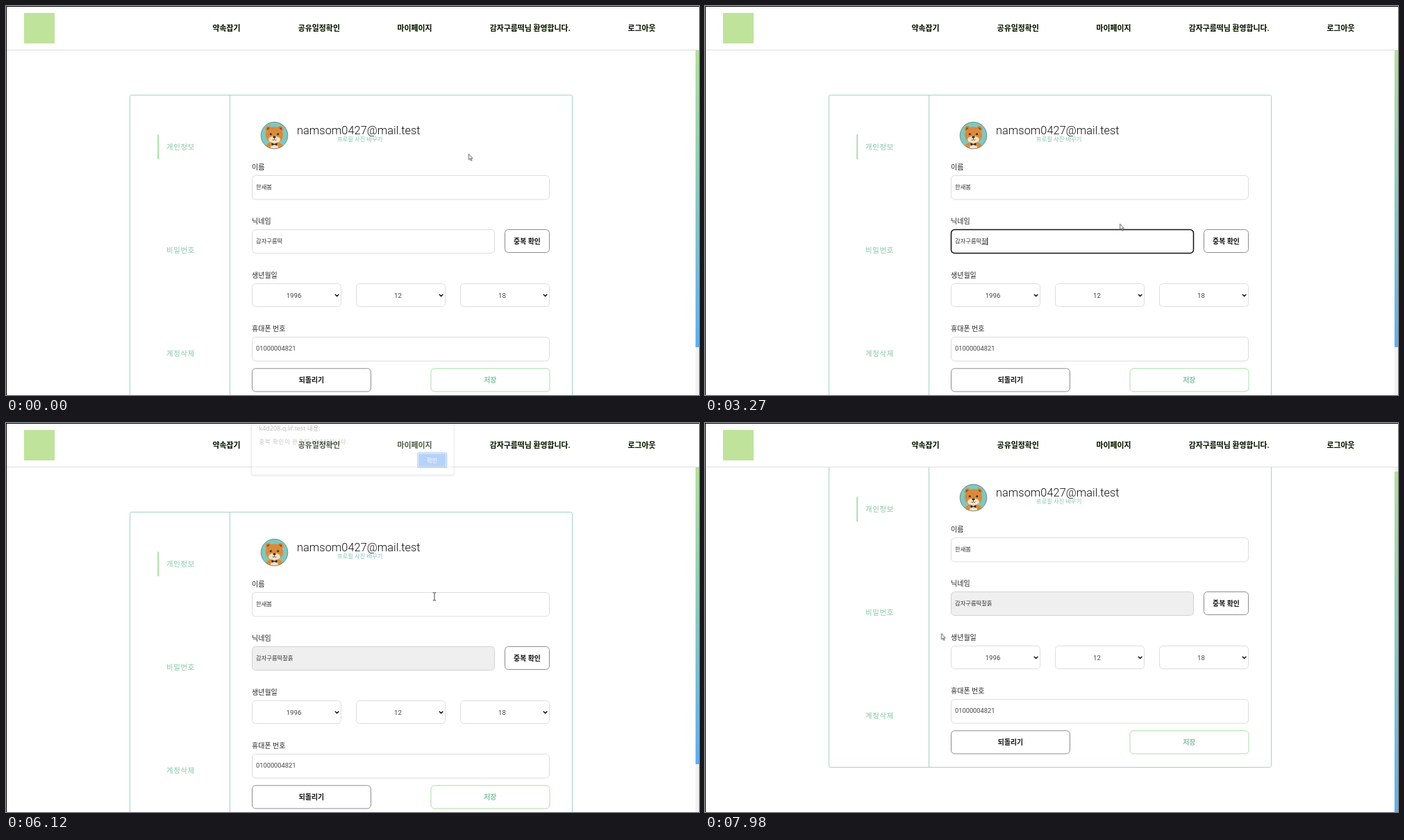
Animation, 998 px wide and 561 px high, one loop 8 s. Source, as an HTML page:

```html
<!DOCTYPE html>
<html lang="ko">
<head>
<meta charset="utf-8">
<title>개인정보 수정</title>
<style>
html, body { margin: 0; width: 100%; height: 100%; overflow: hidden; background: #fff; }
svg { display: block; width: 100vw; height: 100vh; }
text { font-family: Roboto, "Noto Sans CJK KR", "Noto Sans CJK", sans-serif; fill: #222; white-space: pre; }

.nav text { font-size: 10.9px; font-weight: 700; fill: #111; }
.nav { filter: drop-shadow(.5px .7px .5px #96dd55); }
.side text { font-size: 10.4px; letter-spacing: .65px; fill: #84c6a5; }
.label { font-size: 10px; }
.value { font-size: 8.3px; fill: #333; }
.digits { font-size: 9.3px; fill: #444; }
.pick { font-size: 9.6px; fill: #444; text-anchor: middle; }
.btn { font-size: 9.9px; font-weight: 700; fill: #111; text-anchor: middle; }
.frame { fill: none; stroke: #a5d3c3; }
.field { fill: #fff; stroke: #dcdcdc; }
.dark { fill: #fff; stroke: #8c8c8c; }
.chevron { fill: none; stroke: #111; stroke-width: 1.4; }

#page, #dialog, #mouse, #nick, #check, #arrow, #beam, #tick, #bar {
  animation: 8s linear infinite;
}
#nick, #check, #arrow, #beam, #tick { animation-timing-function: step-end; }

#page { animation-name: scroll; }
@keyframes scroll {
  0%, 80.6% { transform: translateY(0); }
  81.5% { transform: translateY(-34px); }
  82.25% { transform: translateY(-63px); }
  83.1% { transform: translateY(-76.6px); }
  84.2%, 100% { transform: translateY(-79px); }
}
#bar { animation-name: bar; }
@keyframes bar {
  0%, 80.6% { y: 64px; height: 428px; }
  81.5% { y: 66px; height: 456px; }
  82.25% { y: 67px; height: 480px; }
  83.1% { y: 68px; height: 491px; }
  84.2%, 100% { y: 70px; height: 491px; }
}
#dialog { opacity: 0; animation-name: dialog; }
@keyframes dialog {
  0%, 61.7% { opacity: 0; transform: translateY(-13px); }
  64%, 75.5% { opacity: 1; transform: none; }
  77%, 100% { opacity: 0; transform: translateY(-13px); }
}
#nick { animation-name: nick; }
@keyframes nick {
  0% { stroke: #dcdcdc; stroke-width: 1; fill: #fff; }
  16.25% { stroke: #111; stroke-width: 1.5; fill: #fff; }
  60.88% { stroke: #dcdcdc; stroke-width: 1; fill: #fff; }
  75.5%, 100% { stroke: #d2d2d2; stroke-width: 1; fill: #efefef; }
}
#check { animation-name: check; }
@keyframes check {
  0% { fill: #fff; stroke: #8c8c8c; }
  52.6% { fill: #bdf0b1; stroke: #a6dc9c; }
  61.7%, 100% { fill: #fff; stroke: #8c8c8c; }
}
#tick { animation-name: tick; }
@keyframes tick {
  0% { opacity: 0; }
  4.125% { opacity: 1; }
  10.375%, 100% { opacity: 0; }
}
#mouse { animation-name: mouse; }
@keyframes mouse {
  0%, 8.6% { transform: translate(666.3px, 213.3px); }
  10.75%, 12% { transform: translate(615px, 394px); }
  14.2% { transform: translate(602px, 345px); }
  16.25% { transform: translate(600px, 340px); }
  17.5%, 50.2% { transform: translate(597.6px, 314.3px); }
  53.2%, 60.9% { transform: translate(769px, 332.3px); }
  64.5% { transform: translate(740px, 290px); }
  68.2% { transform: translate(620.8px, 81px); }
  70.7%, 74.8% { transform: translate(617px, 64px); }
  76.4%, 76.9% { transform: translate(617px, 250.3px); }
  78.3% { transform: translate(612px, 335px); }
  83.1% { transform: translate(609.8px, 356px); }
  86.5%, 93.8% { transform: translate(619.3px, 372px); }
  94.7%, 97.4% { transform: translate(619.3px, 368px); }
  99.7%, 100% { transform: translate(340.5px, 303.6px); }
}
#arrow { animation-name: arrow; }
@keyframes arrow {
  0% { opacity: 1; }
  13.8% { opacity: 0; }
  17% { opacity: 1; }
  76.3% { opacity: 0; }
  77.2%, 100% { opacity: 1; }
}
#beam { opacity: 0; animation-name: beam; }
@keyframes beam {
  0% { opacity: 0; }
  13.8% { opacity: 1; }
  17% { opacity: 0; }
  76.3% { opacity: 1; }
  77.2%, 100% { opacity: 0; }
}
</style>
</head>
<body>
<svg viewBox="0 0 998 561" preserveAspectRatio="none">
  <defs>
    <linearGradient id="thumb" x2="0" y2="1">
      <stop stop-color="#b2df9c"/>
      <stop offset=".5" stop-color="#8ac8c0"/>
      <stop offset="1" stop-color="#62aef0"/>
    </linearGradient>
    <filter id="shade" x="-5%" y="-10%" width="110%" height="125%">
      <feDropShadow dx="0" dy="1" stdDeviation="1.6" flood-opacity=".35"/>
    </filter>
    <clipPath id="round"><circle r="19.3"/></clipPath>
  </defs>

  <g id="page">
    <rect class="frame" x="178.5" y="128.5" width="637" height="447" rx="2"/>
    <path class="frame" d="M322.5 128.5V575.5"/>

    <g class="side">
      <rect x="218.3" y="185.5" width="1.8" height="35.5" fill="#a5dca0"/>
      <text x="231" y="207">개인정보</text>
      <text x="231" y="355.5">비밀번호</text>
      <text x="231" y="504.5">계정삭제</text>
    </g>

    <g transform="translate(386.5 186.7)">
      <g clip-path="url(#round)">
        <circle r="20" fill="#80c7bd"/>
        <ellipse cy="18" rx="13" ry="9" fill="#dd8a38"/>
        <ellipse cy="18" rx="5.5" ry="7" fill="#f3e3c4"/>
        <g fill="#d98a3c"><circle cx="-8.5" cy="-9.5" r="4.3"/><circle cx="8.5" cy="-9.5" r="4.3"/></g>
        <g fill="#8a4e28"><circle cx="-8.5" cy="-9.5" r="2.2"/><circle cx="8.5" cy="-9.5" r="2.2"/></g>
        <ellipse cy="-.5" rx="12.5" ry="12" fill="#d98a3c"/>
        <ellipse cy="6" rx="8.5" ry="5" fill="#f3e3c4"/>
        <g fill="#3b2a22">
          <circle cx="-5.2" cy="-2" r="1.5"/><circle cx="5.2" cy="-2" r="1.5"/>
          <ellipse cy="2.2" rx="2.2" ry="1.5"/>
          <path d="M-4 10.5L0 12.2L4 10.5V15L0 13.2L-4 15Z"/>
        </g>
        <path d="M0 3V6M-3 6Q-1.5 8 0 6Q1.5 8 3 6" fill="none" stroke="#3b2a22" stroke-width=".7"/>
      </g>
      <circle r="19.3" fill="none" stroke="#4d6b66" stroke-width=".7"/>
    </g>
    <text x="419" y="184.5" font-size="16.4" font-weight="300" style="fill:#111">namsom0427@mail.test</text>
    <text x="477" y="195" font-size="8.33" style="fill:#84c4ae">프로필 사진 바꾸기</text>

    <text class="label" x="354" y="235.8">이름</text>
    <rect id="tick" x="372" y="227" width="1" height="12" fill="#111"/>
    <rect class="field" x="354.5" y="244.5" width="428" height="34.5" rx="5"/>
    <text class="value" x="360" y="264.3">한새봄</text>

    <text class="label" x="354" y="314">닉네임</text>
    <rect class="field" id="nick" x="354.5" y="322.5" width="349" height="34" rx="5"/>
    <text class="value" id="typed" x="360" y="342.4"><tspan id="done">감자구름떡</tspan><tspan id="ime" text-decoration="underline"></tspan></text>
    <rect id="caret" y="334" width="1" height="11" fill="#111" opacity="0"/>
    <rect class="dark" id="check" x="718.5" y="322.5" width="64" height="33" rx="5"/>
    <text class="btn" x="750.5" y="342.5">중복 확인</text>

    <text class="label" x="354" y="392">생년월일</text>
    <rect class="field" x="354.5" y="400.5" width="128" height="33" rx="5"/>
    <rect class="field" x="504.5" y="400.5" width="128" height="33" rx="5"/>
    <rect class="field" x="654.5" y="400.5" width="128" height="33" rx="5"/>
    <text class="pick" x="414.5" y="420.5">1996</text>
    <text class="pick" x="564.5" y="420.5">12</text>
    <text class="pick" x="714.5" y="420.5">18</text>
    <path class="chevron" d="M473.8 415.8l2.8 2.8l2.8-2.8m144.4 0l2.8 2.8l2.8-2.8m144.4 0l2.8 2.8l2.8-2.8"
      stroke-linejoin="miter" style="display:none"/>
    <path class="chevron" d="M473.8 415.8l2.8 2.8l2.8-2.8M623.8 415.8l2.8 2.8l2.8-2.8M773.8 415.8l2.8 2.8l2.8-2.8"/>

    <text class="label" x="354" y="468.8">휴대폰 번호</text>
    <rect class="field" x="354.5" y="477.5" width="428" height="34.5" rx="5"/>
    <text class="digits" x="360" y="497.2">01000004821</text>

    <rect class="dark" x="354.5" y="522.8" width="171" height="33.2" rx="5"/>
    <text class="btn" x="440" y="543">되돌리기</text>
    <rect x="612" y="522.8" width="171" height="33.2" rx="5" fill="#fff" stroke="#a9e0a6"/>
    <text class="btn" x="697.3" y="543" style="fill:#82c3a2">저장</text>
  </g>

  <rect x="993" y="64" width="5" height="497" fill="#f1f1f1"/>
  <rect id="bar" x="993" y="64" width="5" height="428" fill="url(#thumb)"/>

  <rect width="998" height="64" fill="#fff"/>
  <path d="M0 63.5H998" stroke="#dedede"/>
  <rect x="26" y="10" width="44" height="44" fill="#bfe39b"/>
  <g class="nav">
    <text x="297.5" y="36.4">약속잡기</text>
    <text x="420.8" y="36.4">공유일정확인</text>
    <text x="563.5" y="36.4">마이페이지</text>
    <text x="696.7" y="36.4">감자구름떡님 환영합니다.</text>
    <text x="895.5" y="36.4">로그아웃</text>
  </g>

  <g id="dialog">
    <rect x="353.5" y="-20" width="291.5" height="103.5" rx="3" fill="#fff" stroke="#c4c4c4" stroke-width=".8" filter="url(#shade)"/>
    <text x="364.5" y="20.2" font-size="9" style="font-family:'Open Sans','Noto Sans CJK KR',sans-serif">k4d208.q.lif.test 내용:</text>
    <text x="364.5" y="39" font-size="8.4" letter-spacing=".7" style="fill:#444">중복 확인이 완료된 닉네임입니다.</text>
    <rect x="592.7" y="51.7" width="42" height="21.2" rx="2.5" fill="#fff" stroke="#1a73e8" stroke-width="1.2"/>
    <rect x="594" y="53" width="39.4" height="18.6" rx="1.5" fill="#1a73e8"/>
    <text x="613.8" y="65.4" font-size="8.2" text-anchor="middle" style="fill:#fff">확인</text>
  </g>

  <path d="M0 .5H998M.5 0V561" stroke="#000"/>

  <g id="mouse">
    <path id="arrow" d="M0 0V8.4L1.9 6.8L3.3 9.9L4.6 9.3L3.2 6.3H5.7Z" fill="#fff" stroke="#333" stroke-width=".8"/>
    <path id="beam" d="M-2.3 -5.5H-.6L0 -5L.6 -5.5H2.3M0 -5V5M-2.3 5.5H-.6L0 5L.6 5.5H2.3" fill="none" stroke="#333" stroke-width=".9"/>
  </g>
</svg>
<script>
const LOOP = 8000, FOCUS = 1300, BLUR = 4870, NAME = '감자구름떡';
const $ = id => document.getElementById(id);
// time, committed text, syllable being composed
const edits = [
  [0, '', ''], [FOCUS, '', ''],
  [2000, 'c', ''], [2130, 'ck', ''], [2330, 'ckf', ''],
  [2670, 'ck', ''], [2730, 'c', ''], [2860, '', ''],
  [3070, '', 'ㅊ'], [3140, '', '차'], [3270, '', '찰'],
  [3340, '찰', 'ㅎ'], [3400, '찰', '흐'], [3530, '찰', '흘'], [3730, '찰', '흙'],
  [BLUR, '찰흙', '']
];
let start, shown;

function draw(now) {
  start ??= now;
  const t = (now - start) % LOOP;
  const edit = edits.findLast(e => e[0] <= t);
  if (edit !== shown) {
    shown = edit;
    $('done').textContent = NAME + edit[1];
    $('ime').textContent = edit[2];
    $('caret').setAttribute('x', Math.round(360 + $('typed').getComputedTextLength()));
  }
  const on = t >= FOCUS && t < BLUR && (t - edit[0]) % 1000 < 500;
  $('caret').setAttribute('opacity', on ? 1 : 0);
  requestAnimationFrame(draw);
}
requestAnimationFrame(draw);
</script>
</body>
</html>
```
